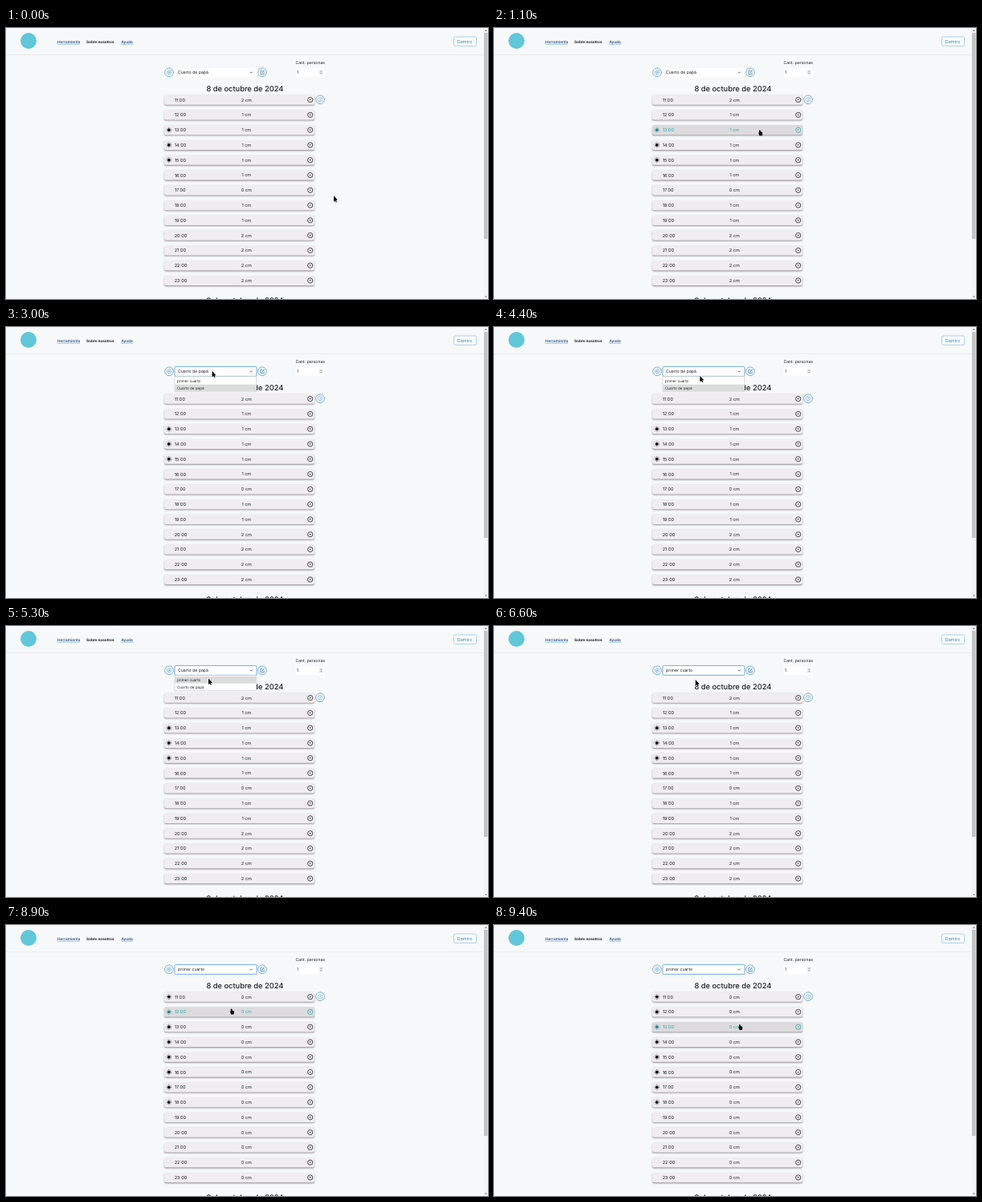
Animation of 600 by 338 pixels, one loop 9.5 s. Source, as an HTML page with a canvas:

```html
<!DOCTYPE html>
<html lang="es">
<head>
<meta charset="utf-8">
<title>Herramienta</title>
<style>
html, body { margin: 0; width: 100%; height: 100%; overflow: hidden; background: #f6f8f9; }
canvas { display: block; width: 600px; height: 338px; }
</style>
</head>
<body>
<canvas id="stage"></canvas>
<script>
const W = 600, H = 338, LOOP = 9500, STEP = 100;
const OPEN = 2600, HIGHLIGHT = 4600, PICK = 6000, LOADED = 7500;
const PAGE = '#f6f8f9', INK = '#1c1d20', BLUE = '#4a93c4', TEAL = '#2ba9ad';
const ROW = { left: 197, right: 384, top: 89.6, gap: 18.78, half: 6.1, count: 13 };
const DEPTHS = [2, 1, 1, 1, 1, 1, 0, 1, 1, 2, 2, 2, 2];

// Pointer path: time, x, y
const PATH = [
  [0, 408, 209.3], [2000, 267.8, 60.3], [3000, 256.6, 55],
  [4400, 256.4, 61], [4700, 254, 63.5], [5300, 252, 65.5],
  [6000, 252, 65.5], [6300, 251, 66.5], [6600, 250.8, 67],
  [8000, 250.8, 67], [8400, 263.6, 97], [9000, 284, 106], [9400, 306, 124]
];

const canvas = document.getElementById('stage');
const ctx = canvas.getContext('2d');
const scale = window.devicePixelRatio || 1;
canvas.width = W * scale;
canvas.height = H * scale;

function text(str, x, y, size, { weight = 400, color = INK, align = 'left' } = {}) {
  ctx.font = `${weight} ${size}px Inter, sans-serif`;
  ctx.textAlign = align;
  ctx.textBaseline = 'alphabetic';
  ctx.fillStyle = color;
  ctx.fillText(str, x, y + size * 0.36);
}

function box(x, y, w, h, r, fill, stroke, line = 0.7) {
  ctx.beginPath();
  ctx.roundRect(x, y, w, h, r);
  if (fill) { ctx.fillStyle = fill; ctx.fill(); }
  if (stroke) { ctx.strokeStyle = stroke; ctx.lineWidth = line; ctx.stroke(); }
}

function circle(x, y, r, fill, stroke, line = 0.8) {
  ctx.beginPath();
  ctx.arc(x, y, r, 0, Math.PI * 2);
  if (fill) { ctx.fillStyle = fill; ctx.fill(); }
  if (stroke) { ctx.strokeStyle = stroke; ctx.lineWidth = line; ctx.stroke(); }
}

function trace(points, color, line) {
  ctx.beginPath();
  points.forEach(([x, y]) => ctx.lineTo(x, y));
  ctx.strokeStyle = color;
  ctx.lineWidth = line;
  ctx.stroke();
}

function shape(points, color) {
  ctx.beginPath();
  points.forEach(([x, y]) => ctx.lineTo(x, y));
  ctx.closePath();
  ctx.fillStyle = color;
  ctx.fill();
}

function triangle(x, y, w, h, color) {
  shape([[x - w, y - h], [x + w, y - h], [x, y + h]], color);
}

function chevron(x, y, w, color, line) {
  trace([[x - w, y - w / 2], [x, y + w / 2], [x + w, y - w / 2]], color, line);
}

function pointerAt(t) {
  const i = PATH.findIndex(p => p[0] > t);
  if (i < 0) return PATH[PATH.length - 1].slice(1);
  const [t0, x0, y0] = PATH[i - 1], [t1, x1, y1] = PATH[i];
  const k = (t - t0) / (t1 - t0);
  return [x0 + (x1 - x0) * k, y0 + (y1 - y0) * k];
}

const rowY = i => ROW.top + i * ROW.gap;

function hoveredRow(x, y) {
  if (x < ROW.left || x > ROW.right) return -1;
  for (let i = 0; i < ROW.count; i++) {
    if (Math.abs(y - rowY(i)) <= ROW.half) return i;
  }
  return -1;
}

function header() {
  ctx.fillStyle = '#e6eaec';
  ctx.fillRect(0, 33, 594, 0.8);
  circle(28, 16, 10, '#62c6d9');
  const nav = { weight: 600, color: '#2f5484' };
  text('Herramienta', 64, 17, 4.7, nav);
  text('Sobre nosotros', 100, 17, 4.65, { weight: 650 });
  text('Ayuda', 143.4, 17, 4.7, nav);
  ctx.fillStyle = '#6fadd4';
  ctx.fillRect(63.5, 19.8, 28.5, 0.7);
  ctx.fillRect(143, 19.8, 15.5, 0.7);
  box(557.5, 11, 28, 11.4, 1.8, '#f9fbfc', '#7db8dc', 0.6);
  text('Damiro', 571, 16.6, 5.5, { color: '#3d86bd', align: 'center' });
}

function scrollbar() {
  ctx.fillStyle = '#f3f4f5';
  ctx.fillRect(594.4, 0, 5.6, H);
  ctx.fillStyle = '#c2c3c4';
  ctx.fillRect(595, 6, 4.5, 257);
  triangle(597.3, 2.8, 1.5, -0.9, '#6b6b6b');
  triangle(597.3, 335.3, 1.5, 0.9, '#6b6b6b');
}

function roundButton(x, y) {
  circle(x, y, 5.4, '#edf4f8', BLUE, 0.65);
}

function controls(picked, focused) {
  roundButton(203, 55.3);
  circle(203, 55.3, 2.5, null, BLUE, 0.45);
  trace([[201.7, 55.3], [204.3, 55.3]], BLUE, 0.55);
  trace([[203, 54], [203, 56.6]], BLUE, 0.55);

  box(210, 49.4, 102, 12, 1.4, '#fff', focused ? '#63a6d8' : '#f0f3f5', focused ? 0.9 : 0.5);
  text(picked, 214, 55.3, 5.2);
  chevron(305.3, 55.4, 1.6, '#333', 0.7);

  roundButton(319, 55.3);
  trace([[319.2, 53.2], [316.9, 53.2], [316.9, 57.6], [321.2, 57.6], [321.2, 55.6]], '#2f6a96', 0.6);
  trace([[318.4, 56.2], [321.6, 52.8]], '#2f6a96', 0.9);

  text('Cant. personas', 360.5, 43.4, 5.1);
  box(360, 49.6, 37, 11.6, 1.4, '#fff', '#f0f3f5', 0.5);
  text('1', 362, 55.3, 5.2);
  ctx.fillStyle = '#ececec';
  ctx.fillRect(389.6, 52.3, 5.4, 6.2);
  triangle(392.3, 53.9, 1.1, -0.6, '#777');
  triangle(392.3, 56.9, 1.1, 0.6, '#777');

  roundButton(391, 89.2);
  circle(391, 89.2, 2.7, null, BLUE, 0.4);
  text('?', 391, 89.2, 4.2, { color: BLUE, align: 'center' });
}

function sun(x, y, color) {
  circle(x, y, 1.9, color);
  for (let i = 0; i < 8; i++) {
    const a = i * Math.PI / 4, c = Math.cos(a), s = Math.sin(a);
    trace([[x + c * 2.4, y + s * 2.4], [x + c * 3.5, y + s * 3.5]], color, 0.65);
  }
}

function row(i, loaded, hover) {
  const y = rowY(i), color = hover ? TEAL : INK;
  const sunny = loaded ? i < 8 : i >= 2 && i <= 4;
  ctx.save();
  ctx.shadowColor = 'rgba(60,50,60,.5)';
  ctx.shadowBlur = 1.8 * scale;
  ctx.shadowOffsetY = 1.1 * scale;
  box(ROW.left, y - ROW.half, ROW.right - ROW.left, ROW.half * 2, 2.2, hover ? '#dddbdd' : '#efedef');
  ctx.restore();
  if (sunny) sun(202.8, y, hover ? '#26878b' : '#111');
  text(`${11 + i}:00`, 209.7, y, 5.6, { color });
  text(`${loaded ? 0 : DEPTHS[i]} cm`, 299.3, y, 5.5, { color, align: 'center' });
  circle(378.7, y, 3.1, null, color, 0.8);
  triangle(378.7, y + 0.1, 1.2, 0.7, color);
}

function dropdown(first) {
  box(210, 61.6, 101.6, 19.2, 0, '#fff', '#b4b7ba', 0.5);
  ctx.fillStyle = '#dadbdb';
  ctx.fillRect(210.4, first ? 63 : 71.6, 100.8, 8.6);
  text('primer cuarto', 213, 67.3, 4.6);
  text('Cuarto de papá', 213, 75.9, 4.6);
}

function arrow(x, y) {
  const p = [[0, 0], [0, 7.4], [1.7, 5.9], [2.8, 8.3], [3.9, 7.8], [2.8, 5.5], [4.9, 5.3]]
    .map(([a, b]) => [x + a, y + b]);
  trace([...p, p[0], p[1]], 'rgba(255,255,255,.8)', 0.8);
  shape(p, '#000');
}

function hand(x, y) {
  box(x - 0.8, y, 1.6, 5, 0.8, '#000');
  box(x - 0.8, y + 2.2, 4, 4.8, 1.2, '#000');
  shape([[x - 2, y + 3.2], [x, y + 3.8], [x + 1, y + 7], [x - 0.2, y + 6.6]], '#000');
}

function draw(t) {
  const open = t >= OPEN && t < PICK;
  const loaded = t >= LOADED;
  const [x, y] = pointerAt(t);
  const hover = open ? -1 : hoveredRow(x, y);
  const heading = { weight: 500, align: 'center' };

  ctx.setTransform(scale, 0, 0, scale, 0, 0);
  ctx.textRendering = 'geometricPrecision';
  ctx.fillStyle = PAGE;
  ctx.fillRect(0, 0, W, H);
  header();
  text('8 de octubre de 2024', 297.4, 75.3, 9.3, heading);
  for (let i = 0; i < ROW.count; i++) row(i, loaded, i === hover);
  text('9 de octubre de 2024', 297.4, 339.4, 9.3, heading);
  controls(t >= PICK ? 'primer cuarto' : 'Cuarto de papá', t >= OPEN);
  if (open) dropdown(t >= HIGHLIGHT);
  scrollbar();
  (hover < 0 ? arrow : hand)(x, y);
}

function tick() {
  const t = performance.now() % LOOP;
  draw(Math.floor(t / STEP) * STEP);
  requestAnimationFrame(tick);
}
tick();
</script>
</body>
</html>
```
